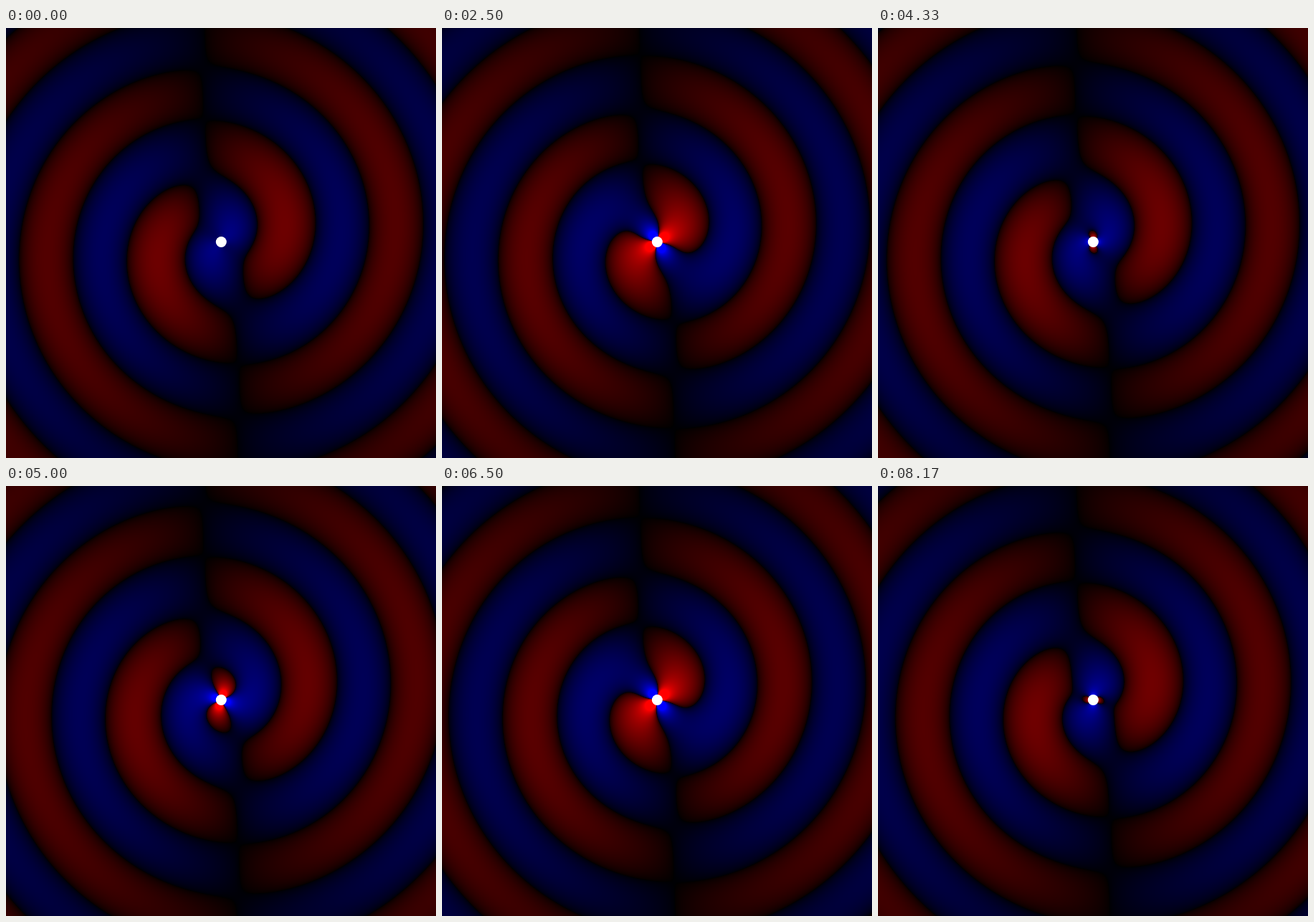
Recreate the animation shown at these times as an HTML page with a canvas. Size 600 by 600 pixels, loop 8340 ms.

```html
<!DOCTYPE html>
<html lang="en">
<head>
<meta charset="utf-8">
<title>Rotating dipole field</title>
<style>
  html, body { margin: 0; width: 100%; height: 100%; overflow: hidden; background: #000; }
  canvas { display: block; }
</style>
</head>
<body>
<canvas id="stage" width="600" height="600"></canvas>
<script>
const SIZE = 600, CX = 300.3, CY = 298.5;
const DOT_RADIUS = 7.5;
const K = 2 * Math.PI / 150;      // wave number, per pixel
const LOOP = 8340, STEPS = 25;    // loop in ms, steps per turn
const PHASE = 0.06;
const GAIN = 164;                 // brightness of a field of strength 1
const FINE = 8;                   // radial table entries per pixel

const ctx = document.getElementById('stage').getContext('2d');
const image = ctx.createImageData(SIZE, SIZE);
const pixels = image.data;

// Hankel functions of order 0 and 2, from the power series of J0 and Y0
function hankel(x) {
  const q = x * x / 4, log = Math.log(x / 2) + 0.5772156649015329;
  let term = 1, harmonic = 0, j0 = 1, j1 = 0, s0 = 0, s1 = 0;
  for (let m = 1; m < 60; m++) {
    term *= -q / (m * m);
    harmonic += 1 / m;
    const slope = term * 2 * m / x;
    j0 += term;
    j1 -= slope;
    s0 += harmonic * term;
    s1 += harmonic * slope;
  }
  const y0 = 2 / Math.PI * (log * j0 - s0);
  const y1 = -2 / Math.PI * (j0 / x - log * j1 - s1);
  return { j0, y0, j2: 2 * j1 / x - j0, y2: 2 * y1 / x - y0 };
}

const radial = Array.from({ length: 430 * FINE }, (_, i) => hankel(K * Math.max(i, 1) / FINE));

// Vertical field = cosPart * cos(a) + sinPart * sin(a) + still
const count = SIZE * SIZE;
const cosPart = new Float32Array(count);
const sinPart = new Float32Array(count);
const still = new Float32Array(count);

for (let i = 0; i < count; i++) {
  const dx = i % SIZE + 0.5 - CX;
  const dy = CY - Math.floor(i / SIZE) - 0.5;
  const r = Math.max(Math.hypot(dx, dy), 1);
  const twice = 2 * Math.atan2(dy, dx);
  const c = Math.cos(twice), s = Math.sin(twice);
  const h = radial[Math.round(r * FINE)];
  cosPart[i] = (c * h.j2 + s * h.y2 - h.j0) / 2;
  sinPart[i] = (c * h.y2 - s * h.j2 - h.y0) / 2;
  still[i] = 2 / (Math.PI * (K * r) ** 2) * Math.sin(twice + PHASE);
  pixels[4 * i + 3] = 255;
}

function draw(step) {
  const angle = PHASE + 2 * Math.PI * step / STEPS;
  const c = Math.cos(angle), s = Math.sin(angle);
  for (let i = 0; i < count; i++) {
    const field = cosPart[i] * c + sinPart[i] * s + still[i];
    const light = GAIN * Math.sqrt(Math.abs(field));
    pixels[4 * i] = field > 0 ? light : 0;
    pixels[4 * i + 2] = field < 0 ? light : 0;
  }
  ctx.putImageData(image, 0, 0);
  ctx.fillStyle = '#fff';
  ctx.beginPath();
  ctx.arc(CX, CY, DOT_RADIUS, 0, 2 * Math.PI);
  ctx.fill();
}

// Three steps per half second: 170, 160 and 170 ms
function stepAt(time) {
  const part = time % 500;
  return 3 * Math.floor(time / 500) + (part >= 330 ? 2 : part >= 170 ? 1 : 0);
}

const start = performance.now();
let shown = -1;

function tick() {
  const step = stepAt((performance.now() - start) % LOOP);
  if (step !== shown) draw(shown = step);
  requestAnimationFrame(tick);
}
tick();
</script>
</body>
</html>
```
